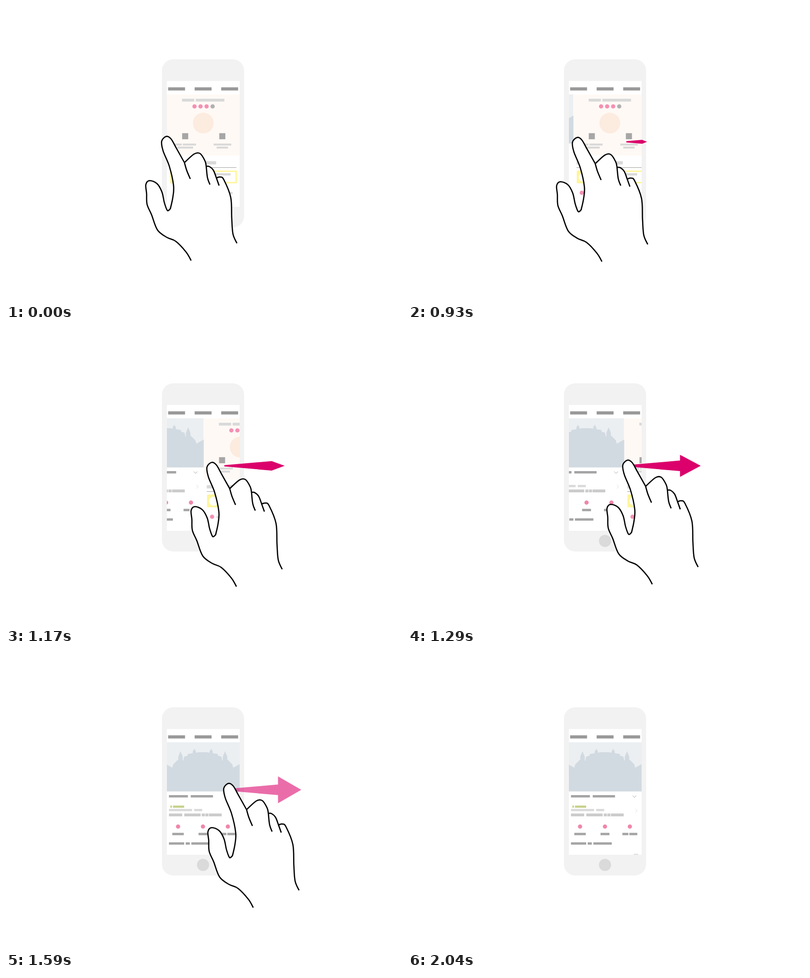
These frames come from a looping animation (800x600 px, 2550 ms). An HTML page:

```html
<!DOCTYPE html>
<html lang="en">
<head>
<meta charset="utf-8">
<title>Swipe gesture</title>
<style>
  html, body { margin: 0; width: 100%; height: 100%; overflow: hidden; background: #fff; }
  svg { display: block; }
</style>
</head>
<body>
<svg width="800" height="600" viewBox="0 0 800 600">
  <clipPath id="view"><rect x="325" y="179" width="147" height="228"/></clipPath>

  <rect x="315" y="108" width="166" height="341" rx="23" fill="#f2f2f2"/>
  <circle cx="398" cy="427.5" r="12.3" fill="#dadada"/>
  <rect x="325" y="152" width="147" height="255" fill="#fff"/>
  <g id="header"></g>

  <g clip-path="url(#view)">
    <g id="profile">
      <rect x="325" y="179.5" width="149" height="123.5" fill="#fff9f5"/>
      <circle cx="398.5" cy="237.3" r="21" fill="#fcebdf"/>
      <path d="M331 327.5H465.5" stroke="#a3a5a1"/>
      <rect x="333" y="335" width="132" height="23" fill="#fff" stroke="#fff59a" stroke-width="2.8"/>
      <rect x="332" y="334" width="26" height="25" fill="#fff59a"/>
      <circle cx="345" cy="347" r="9.3" fill="#fff"/>
    </g>
    <g id="place">
      <rect x="321" y="179" width="152.5" height="99.5" fill="#ebeff2"/>
      <g id="skyline"></g>
      <g fill="none">
        <path d="M453.7 287l3.8 3.7l3.8 -3.7" stroke="#aaa"/>
        <path d="M459.3 314l3.7 3.5l-3.7 3.5" stroke="#ddd"/>
      </g>
    </g>
  </g>

  <polygon id="arrow" fill="#db006b"/>

  <g id="hand" stroke="#000" stroke-width="2.5" stroke-linejoin="round">
    <path id="outline" fill="#fff"/>
    <path id="creases" fill="none"/>
  </g>
</svg>
<script>
const LOOP = 2550, STEP = 30, PAGE = 149;
const PINK = '#f086aa', DARK = '#a4a4a4', LIGHT = '#d9d9d9';
const $ = id => document.getElementById(id);

function set(el, attrs) {
  for (const key in attrs) el.setAttribute(key, attrs[key]);
}

function add(parent, tag, attrs) {
  const el = document.createElementNS('http://www.w3.org/2000/svg', tag);
  set(el, attrs);
  $(parent).append(el);
}

const dot = (parent, fill, cx, cy) => add(parent, 'circle', { cx, cy, r: 4.3, fill });

// A line of placeholder words, running from x
function words(parent, fill, x, y, height, gap, ...widths) {
  for (const width of widths) {
    add(parent, 'rect', { x, y, width, height, fill });
    x += width + gap;
  }
}

function centred(parent, fill, cx, y, height, gap, ...widths) {
  const total = widths.reduce((sum, w) => sum + w + gap, -gap);
  words(parent, fill, cx - total / 2, y, height, gap, ...widths);
}

function drawProfile() {
  centred('profile', LIGHT, 398.4, 188, 5.7, 3, 24.8, 57.9);
  for (let i = 0; i < 4; i++) dot('profile', i < 3 ? '#f590b4' : '#b0b0b0', 380.8 + 12.2 * i, 203.5);
  for (const cx of [362, 437]) centred('profile', '#a6a6a6', cx, 257.8, 12.3, 0, 12.3);
  centred('profile', LIGHT, 362, 278.8, 4, 2, 15, 26.8);
  centred('profile', LIGHT, 362, 285, 4, 0, 32);
  centred('profile', LIGHT, 437.3, 278.8, 4, 0, 35.7);
  centred('profile', LIGHT, 437, 285, 4, 0, 23);
  words('profile', LIGHT, 331, 314.5, 6.7, 0, 93.6);
  words('profile', LIGHT, 362, 339, 4.5, 0, 91.7);
  words('profile', LIGHT, 351, 377, 4.5, 0, 106.7);
  dot('profile', '#f590b4', 341.8, 378.5);
}

function drawPlace() {
  const left = 329.2;
  words('place', DARK, left, 286, 4.8, 5.7, 38.3, 45);
  words('place', '#c6d088', 332, 307.3, 4.3, 2, 3.2, 22.8);
  words('place', '#dadada', left, 314, 4.6, 4.4, 46.6, 16.2);
  words('place', '#cbcbcb', left, 323.3, 5.8, 4.2, 26.8, 33.1);
  words('place', '#cbcbcb', 395.5, 323.3, 5.8, 1, 6.2, 6.3, 25.7);
  [[23.2], [18], [12.1, 16.1]].forEach((label, i) => {
    const cx = 347.6 + 50.3 * i;
    dot('place', PINK, cx, 349.8);
    centred('place', DARK, cx, 362.5, 4.8, 1.9, ...label);
  });
  words('place', DARK, left, 381.7, 4.8, 3, 30.8, 8.4, 37.3);
  words('place', '#dedede', 456, 405, 4, 0, 9);
}

function drawSkyline() {
  const fill = '#d2dae1', mirror = ([x, y]) => [795 - x, y];
  const shape = points => add('skyline', 'polygon', { points: points.join(' '), fill });
  const roof = [[321, 278.5], [321, 222], [336, 230.5], [338, 223.5], [347, 214.5], [358, 216],
    [360, 208], [367, 206], [367, 202.7], [390, 199]];
  shape([...roof, ...roof.map(mirror).reverse()]);

  const spire = (x, y, w, h) => {
    const side = [[0, 0], [.35, .2], [1, .55], [1, 1]];
    const points = [...side.map(([u, v]) => [x - u * w, y + v * h]),
      ...side.map(([u, v]) => [x + u * w, y + v * h]).reverse()];
    shape(points);
    shape(points.map(mirror));
  };
  spire(352.5, 197, 4.5, 20);
  spire(380.5, 192, 3.2, 10);
}

// Smooth Bezier segments through points, each given as "x,y"
function curve(text) {
  const p = text.split(' ').map(pair => pair.split(',').map(Number));
  const at = i => p[Math.min(p.length - 1, Math.max(0, i))];
  const lean = (i, k) => at(i).map((v, a) => v + k * (at(i + 1)[a] - at(i - 1)[a]) / 6);
  let d = '';
  for (let i = 1; i < p.length; i++) d += `C${lean(i - 1, 1)} ${lean(i, -1)} ${p[i]}`;
  return { d, start: 'M' + p[0] };
}

function drawHandShape() {
  const thumb = curve('374,516 364,499 343,477 325,469 306,454 294,423 285,402 284,380 282.5,362 290,354 ' +
    '305,360 315,377 320,399 326,414.5 332,411');
  const index = curve('332,411 337,388 338.5,364 330,325 317.5,294 314.5,274 324,264.3 333.5,269.5 344,288 360.5,317.5');
  const middle = curve('360.5,317.5 380,300 392,299 402,314 404.5,325');
  const ring = curve('404.5,325 411,325.5 419,333 425,348.5');
  const little = curve('425,348.5 433,346.7 440,352 454,388 456,430 458.5,462 466.5,481');
  const creases = ['360.5,317.5 365,333 372.3,350.5', '404.5,325 407,348 412,362', '425,348.5 430.5,364'];
  set($('outline'), { d: thumb.start + [thumb, index, middle, ring, little].map(c => c.d).join('') });
  set($('creases'), { d: creases.map(curve).map(c => c.start + c.d).join('') });
}

const ramp = (t, from, to) => Math.min(1, Math.max(0, (t - from) / (to - from)));
const ease = u => u * u * (3 - 2 * u);
const move = (id, x, y = 0) => set($(id), { transform: `translate(${x} ${y})` });

function drawArrow(t) {
  const grow = ramp(t, 810, 1218), open = ramp(t, 1218, 1320);
  const x = 441, y = 275.3, neck = x + 108.5 * grow;
  const tip = neck + 2 + 27.4 * grow + 17.6 * open;
  const shaft = 1.2 + 9.6 * grow, head = shaft + 16.4 * open;
  set($('arrow'), {
    points: [[x, y - 1.2], [neck, y - shaft], [neck, y - head], [tip, y],
      [neck, y + head], [neck, y + shaft], [x, y + 1.2]].join(' '),
    opacity: t < 810 ? 0 : 1 - ramp(t, 1500, 1710)
  });
}

function drawHand(t) {
  const u = ease(ramp(t, 795, 1365)), v = 1 - u, fade = ramp(t, 1710, 2040);
  move('hand', 125.5 * u, 16.5 * v * v * u + 27.4 * v * u * u - 2 * u ** 3);
  // the skin stays solid longer than the line
  set($('hand'), { 'stroke-opacity': 1 - fade, 'fill-opacity': 1 - fade * fade });
}

function draw(now) {
  const t = Math.floor(now % LOOP / STEP) * STEP;
  const shift = PAGE * ease(ramp(t, 825, 1515));
  move('profile', shift);
  move('place', shift - PAGE);
  drawArrow(t);
  drawHand(t);
}

for (let i = 0; i < 3; i++) words('header', '#999', 327.5 + 53.6 * i, 164.8, 6.5, 0, 34.2);
drawProfile();
drawPlace();
drawSkyline();
drawHandShape();

const start = performance.now();
function tick() {
  draw(performance.now() - start);
  requestAnimationFrame(tick);
}
tick();
</script>
</body>
</html>
```
